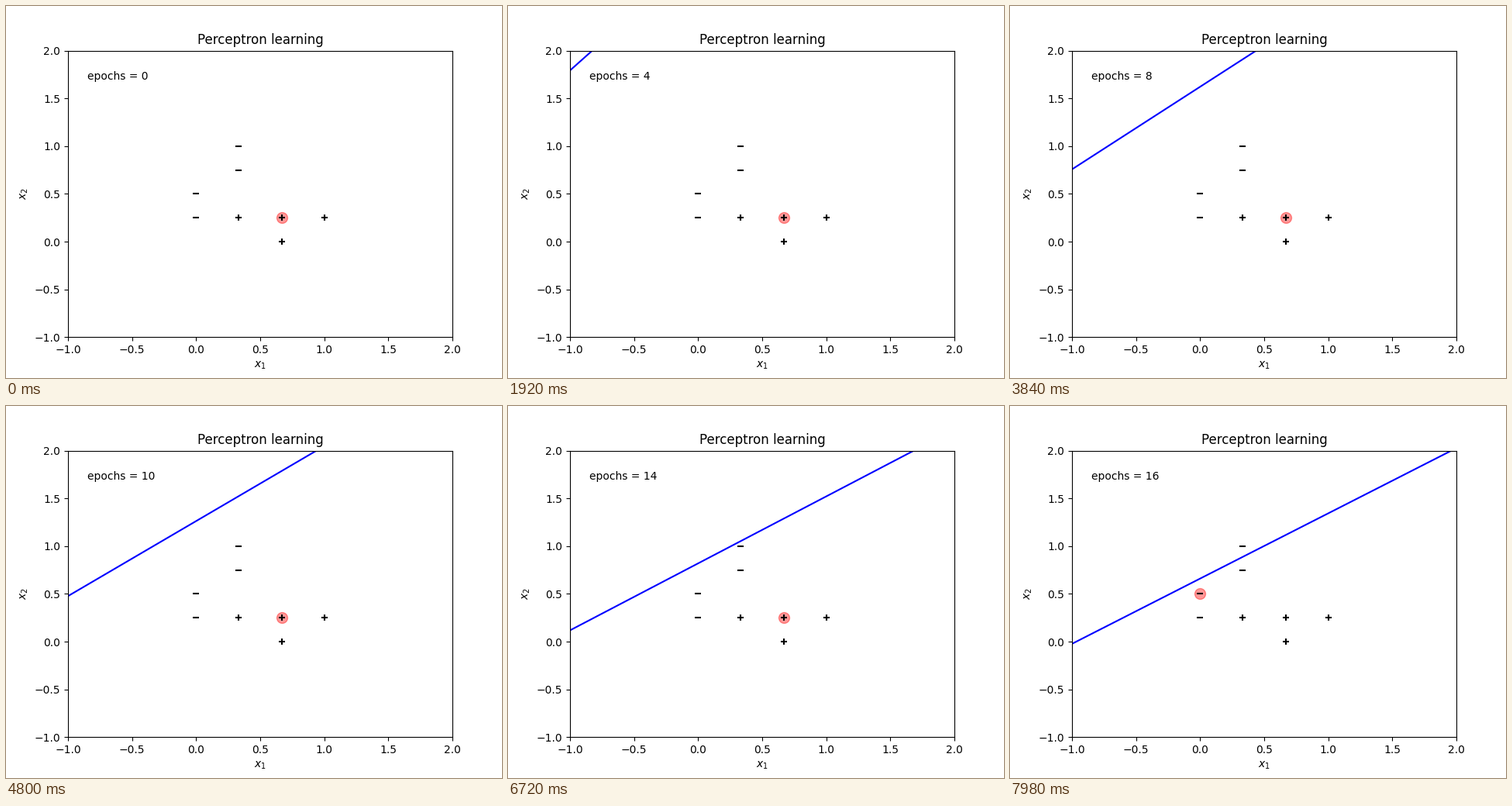
These frames come from a looping animation (640x480 px, 8 s). A matplotlib script:

```python
import numpy as np
import matplotlib.pyplot as plt
from matplotlib.animation import FuncAnimation

STEP_MS = 60
TICK_MS = 20
LOOP_MS = 8000
RATE = 0.1

POSITIVE = [(0.67, 0.25), (0.33, 0.25), (0.67, 0.0), (1.0, 0.25)]
NEGATIVE = [(0.33, 1.0), (0.0, 0.5), (0.33, 0.75), (0.0, 0.25)]
POINTS = np.array(POSITIVE + NEGATIVE)
LABELS = [1] * len(POSITIVE) + [0] * len(NEGATIVE)


def train(steps):
    """Weights of a sigmoid neuron after each single-sample update."""
    w = np.array([0.884, 0.2755, -0.1175])
    history = []
    for i in range(steps):
        k = i % len(POINTS)
        x = np.array([1.0, *POINTS[k]])
        out = 1 / (1 + np.exp(-w @ x))
        w = w + RATE * (LABELS[k] - out) * out * (1 - out) * x
        history.append(w)
    return history


weights = train(-(-LOOP_MS // STEP_MS))

fig, ax = plt.subplots(figsize=(6.4, 4.8), dpi=100)
ax.set(xlim=(-1, 2), ylim=(-1, 2), xlabel="$x_1$", ylabel="$x_2$",
       title="Perceptron learning")

halo = ax.scatter(*POINTS[0], s=100, c="red", alpha=0.4)
ax.scatter(*zip(*POSITIVE), marker="+", c="black")
ax.scatter(*zip(*NEGATIVE), marker="_", c="black")
boundary, = ax.plot([], [], "b-")
counter = ax.text(-0.85, 1.7, "")
span = np.array([-1.0, 2.0])


def update(tick):
    step = tick * TICK_MS // STEP_MS
    epoch, k = divmod(step, len(POINTS))
    bias, w1, w2 = weights[step]
    halo.set_offsets(POINTS[k:k + 1])
    boundary.set_data(span, -(bias + w1 * span) / w2)
    counter.set_text(f"epochs = {epoch}")
    return halo, boundary, counter


anim = FuncAnimation(fig, update, frames=LOOP_MS // TICK_MS,
                     interval=TICK_MS, repeat=True, repeat_delay=0)
plt.show()
```
